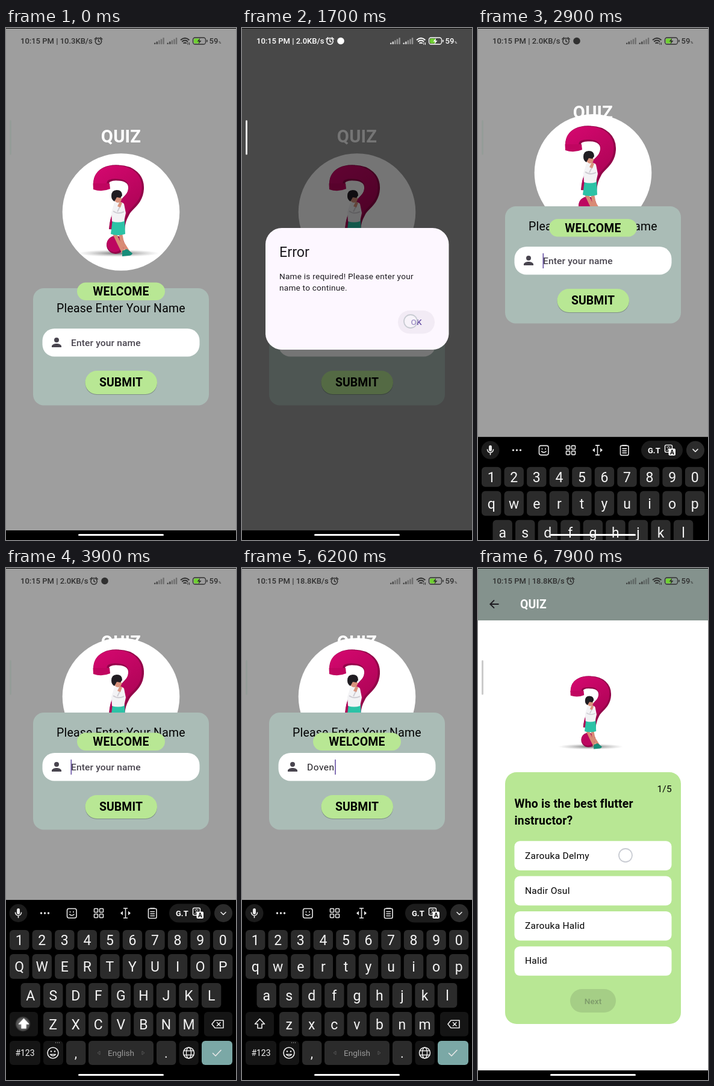
Animation, 382 px wide and 850 px high, one loop 8000 ms. Source, as an HTML page:

```html
<!DOCTYPE html>
<html lang="en">
<head>
<meta charset="utf-8">
<title>Quiz app</title>
<style>
  html, body { margin: 0; width: 100%; height: 100%; overflow: hidden; background: #000; }
  svg { display: block; width: 100vw; height: 100vh; }
  text { font-family: Roboto, "Noto Sans CJK SC", sans-serif; white-space: pre; }
  .line { fill: none; stroke: #e8e8e8; stroke-width: 1.6; stroke-linecap: round; stroke-linejoin: round; }
</style>
</head>
<body>
<svg id="stage" viewBox="0 0 382 850"></svg>
<script>
const LOOP = 8000;
const GREEN = '#b8e794', INK = '#1d1b20', SAGE = '#aabcb6';

const rect = (x, y, w, h, r, fill, more = '') =>
  `<rect x="${x}" y="${y}" width="${w}" height="${h}" rx="${r}" fill="${fill}" ${more}/>`;
const dot = (x, y, r, fill, more = '') => `<circle cx="${x}" cy="${y}" r="${r}" fill="${fill}" ${more}/>`;
const line = (d, more = '') => `<path class="line" d="${d}" ${more}/>`;
// cy is the middle of the capitals
const label = (x, cy, size, text, o = {}) =>
  `<text x="${x}" y="${cy + size * 0.355}" font-size="${size}" font-weight="${o.w || 400}" fill="${o.fill || '#000'}"
    text-anchor="${o.at || 'start'}" letter-spacing="${o.ls || 0}" ${o.more || ''}>${text}</text>`;

// ---------- illustration ----------
const hook = 'M158 260C157 243 174 239.5 187 240.5C206 241 217 252 216 267C215 286 199 291 193 304C187 315 185 322 184 335';
const art = `<g id="art">
  <ellipse cx="187" cy="374" rx="68" ry="6" fill="url(#floor)"/>
  <path d="${hook}" fill="none" stroke="#930349" stroke-width="26" stroke-linejoin="round"/>
  <path d="${hook}" fill="none" stroke="url(#pink)" stroke-width="22" transform="translate(-1.5 -1)"/>
  <path d="M144.500 258h27.500l1 9q-14 6-28 1z" fill="#c00560"/>
  ${dot(182, 360, 15, '#930349')}${dot(180.500, 359, 13, '#bd0660')}
  <path d="M180 341L187 356L195 372M190 341L193 356L203 372" fill="none" stroke="#d98b75" stroke-width="6"/>
  <path d="M193 370l8-3l9 7q-1 4-7 4l-10 1z" fill="#178d79"/>
  <path d="M177 318h20l1 24q-12 4-24 0z" fill="#2cc2a6"/>
  <path d="M180 290q11-4 16 2l3 15l-3 14q-10 3-20 0l-1-15z" fill="#f3f3f5"/>
  <path d="M178 304q8 6 18 1M185 305l5-10" fill="none" stroke="#cfcdd3" stroke-width="2"/>
  ${dot(186, 284, 6, '#d9937d')}
  <path d="M185 296l4-8l4 2l-3 8z" fill="#d9937d"/>
  <path d="M175 279q0-10 9-10q9 0 9 9l-3 4l-6-1l-4 7q-5-3-5-9z" fill="#201d22"/>
</g>`;

// ---------- name page ----------
const person = '<path d="M84 522a4 4 0 1 0 0-8a4 4 0 0 0 0 8zm0 1.900c-3 0-8 1.500-8 4.200v1.900h16v-1.900c0-2.700-5-4.200-8-4.200z" fill="#49454f"/>';
const namePage = `<g id="namePage">
  ${rect(0, 0, 382, 834, 0, '#9e9e9e')}
  <g id="title">${label(191, 180, 29.15, 'QUIZ', { w: 700, fill: '#fff', at: 'middle', ls: 0.24 })}</g>
  <g id="badge">${dot(191, 305.5, 97.3, '#fff')}<use href="#art"/></g>
  <g id="card">
    ${rect(45, 432, 292, 194.5, 18, SAGE)}
    ${label(84, 465, 19.4, 'Please Enter Your Name', { ls: 0.24 })}
    ${rect(60.5, 499, 261, 46.5, 20, '#fff')}
    ${person}
    ${label(108, 522, 15.55, 'Enter your name', { w: 500, fill: '#49454f', ls: 0.15, more: 'id="hint"' })}
    ${label(108, 522, 15.55, '', { fill: INK, ls: 0.49, more: 'id="typed"' })}
    ${rect(107.5, 510, 1.6, 25, 0, '#6750a4', 'id="caret"')}
    ${rect(131.5, 570.5, 119.5, 38.5, 19.2, '#7f9088')}
    ${rect(131.5, 569, 119.5, 39, 19.5, GREEN)}
    <g clip-path="url(#pill)">${dot(228, 588, 0, '#8a9a78', 'id="ripple"')}</g>
    ${label(191, 588.5, 19.4, 'SUBMIT', { w: 700, at: 'middle', ls: 0.1 })}
  </g>
  <g id="welcome">
    ${rect(118, 422.500, 146, 29.500, 14.700, GREEN)}
    ${label(191, 437.5, 19.4, 'WELCOME', { w: 700, at: 'middle', ls: 0.24 })}
  </g>
</g>`;

// ---------- dialog ----------
const dialog = `<g id="dialog">
  ${rect(0, 0, 382, 834, 0, '#000', 'fill-opacity=".54"')}
  ${rect(39, 332, 304.500, 202, 27, '#fdf7ff')}
  ${label(62, 371.5, 23.3, 'Error', { fill: INK })}
  ${label(62, 412, 13.6, 'Name is required! Please enter your', { fill: INK, ls: 0.24 })}
  ${label(62, 431.5, 13.6, 'name to continue.', { fill: INK, ls: 0.24 })}
  ${rect(259, 469, 61, 38.5, 19.2, '#f2ebf5', 'id="okPress"')}
  ${label(289.5, 488, 13.6, 'OK', { w: 500, fill: '#6750a4', at: 'middle', ls: 0.1 })}
</g>`;

// ---------- question page ----------
const answers = ['Zarouka Delmy', 'Nadir Osul', 'Zarouka Halid', 'Halid'];
const quizPage = `<g id="quizPage">
  ${rect(0, 0, 382, 834, 0, '#fff')}
  ${rect(0, 0, 382, 87, 0, '#84928d')}
  <path d="M34.500 60H20.500M27 53.300L20.300 60L27 66.700" fill="none" stroke="${INK}" stroke-width="1.900"/>
  ${label(70, 60.5, 19.4, 'QUIZ', { w: 700, fill: '#fff', ls: 0.1 })}
  <use href="#art" transform="translate(37.8 -2.6) scale(.8)"/>
  ${rect(45, 339, 292, 418, 19, GREEN)}
  ${label(322, 366, 15.55, '1/5', { at: 'end', ls: 0.24 })}
  ${label(60.5, 391.5, 19.4, 'Who is the best flutter', { w: 700, ls: 0.2 })}
  ${label(60.5, 419.5, 19.4, 'instructor?', { w: 700, ls: 0.2 })}
  ${answers.map((a, i) => rect(60.5, 453.3 + i * 58.3, 261, 48.6, 9, '#fff') +
    label(78, 477 + i * 58.3, 15.55, a, { ls: 0.24 })).join('')}
  ${rect(153, 699, 76, 39, 19.500, '#a5ce86')}
  ${label(191, 719, 13.6, 'Next', { w: 500, fill: '#7d9a6a', at: 'middle', ls: 0.1 })}
</g>`;

// ---------- keyboard, drawn from its own top edge ----------
const KEY_TOP = 551, KEY_H = 299;
const rows = [['1234567890', 6, 50, 33], ['qwertyuiop', 6, 90, 41], ['asdfghjkl', 24.5, 138, 41], ['zxcvbnm', 62, 186, 40.5]];
const spots = { shift: [28, 757], back: [352, 757] };
let keys = '';
for (const [chars, x0, y, h] of rows) {
  [...chars].forEach((c, i) => {
    const x = x0 + i * 37.55, cx = x + 16.2, cy = y + h / 2;
    spots[c] = [cx, KEY_TOP + cy];
    keys += rect(x, y, 32.4, h, 6, '#2b2b2b') +
      label(cx, cy + 0.5, 23, c, { fill: '#f4f4f4', at: 'middle', more: 'class="ch"' });
  });
}
const DARK = '#151515', MID = '#2b2b2b';
const tools = `
  ${dot(20.5, 22, 15, '#1c1c1c')}
  <g id="mic">${rect(18, 14, 5, 10, 2.5, '#e8e8e8')}${line('M15.500 21a5 5 0 0 0 10 0M20.500 26.500v3')}</g>
  ${[58.5, 64.5, 70.5].map(x => dot(x, 22, 1.7, '#e8e8e8')).join('')}
  ${rect(101.5, 14.500, 15.500, 15.500, 3, 'none', 'stroke="#e8e8e8" stroke-width="1.600"')}
  ${dot(106.5, 20, 1.1, '#e8e8e8')}${dot(112, 20, 1.1, '#e8e8e8')}${line('M105.500 24q3.700 3.500 7.500 0')}
  ${[146.500, 155.500].map(x => [14.500, 23.500].map(y =>
    rect(x, y, 6, 6, 1, 'none', 'stroke="#e8e8e8" stroke-width="1.600"')).join('')).join('')}
  ${line('M195.500 14h6M198.500 14v16M195.500 30h6')}
  <path d="M194 18.500v7l-4-3.500zM203 18.500v7l4-3.500z" fill="#e8e8e8"/>
  ${rect(236.500, 14.500, 13.500, 16, 2, 'none', 'stroke="#e8e8e8" stroke-width="1.600"')}
  ${line('M240 14h6.500M240 19.500h6.500M240 23h6.500M240 26.500h6.500')}
  ${rect(271, 6.5, 69, 31, 15.500, '#1c1c1c')}
  ${label(282, 22.5, 13, 'G.T', { w: 700, fill: '#fff' })}
  ${rect(310.500, 13.500, 12, 12, 2, 'none', 'stroke="#fff" stroke-width="1.400"')}
  ${label(316.500, 19.5, 8, '文', { fill: '#fff', at: 'middle' })}
  ${rect(316.500, 19.500, 11.500, 11.500, 2, '#fff')}
  ${label(322.300, 25.5, 10, 'A', { w: 700, at: 'middle' })}
  ${dot(361, 22, 15, '#2b2b2b')}${line('M357 20.500l4 4l4-4')}`;
const controls = `
  ${rect(6, 186, 47, 40.5, 6, DARK)}${dot(28, 206, 13, 'url(#glow)', 'id="shiftGlow"')}
  <path id="arrow" d="M29.500 197.500l8 8.500h-4.500v7h-7v-7h-4.500z" stroke="#f0f0f0" stroke-width="1.600" stroke-linejoin="round"/>
  ${rect(329, 186, 47, 40.5, 6, DARK)}
  ${line('M347 200h14v12.500h-14l-5-6.200zM350.500 203.500l5.500 5.500m0-5.500l-5.500 5.500')}
  ${rect(6, 234, 51, 40, 6, DARK)}${label(31.500, 254.5, 14, '#123', { fill: '#f0f0f0', at: 'middle' })}
  ${rect(62, 234, 33, 40, 6, DARK)}${dot(78, 254, 9, 'none', 'stroke="#f0f0f0" stroke-width="1.600"')}
  ${dot(75, 251.500, 1.3, '#f0f0f0')}${dot(81, 251.500, 1.3, '#f0f0f0')}${line('M73.500 256.500q4.500 5 9 0z')}
  ${[82.5, 85.5, 88.5].map(x => dot(x, 237, 0.7, '#aaa')).join('')}
  ${rect(100, 234, 32.4, 40, 6, MID)}${label(116, 254.5, 22, ',', { fill: '#f0f0f0', at: 'middle' })}
  ${rect(137, 234, 108, 40, 6, MID)}${label(191, 254, 13.6, 'English', { fill: '#9a9a9a', at: 'middle' })}
  <path d="M156 251v6l-4-3zM226 251v6l4-3z" fill="none" stroke="#555"/>
  ${rect(250, 234, 32.4, 40, 6, MID)}${label(266, 254.5, 22, '.', { fill: '#f0f0f0', at: 'middle' })}
  ${rect(287.500, 234, 32.4, 40, 6, DARK)}
  ${dot(303.500, 254, 9, 'none', 'stroke="#f0f0f0" stroke-width="1.500"')}
  <ellipse cx="303.500" cy="254" rx="4" ry="9" fill="none" stroke="#f0f0f0" stroke-width="1.400"/>
  ${line('M295.500 250.500h16M295.500 257.500h16')}
  ${rect(325, 234, 51, 40, 6, '#7ba8a6')}${line('M343.500 254.500l4.500 4.500l9-9.500')}`;
const keyboard = `<g id="keyboard">${rect(0, 0, 382, KEY_H, 0, '#000')}${tools}${keys}${controls}</g>`;

// ---------- system bars ----------
const signal = x => [0, 1, 2, 3, 4].map(i =>
  rect(x + i * 3.6, 24.500 - i * 2.1, 2.4, 2.5 + i * 2.1, 0.8, 'currentColor', `opacity="${i < 2 ? 0.8 : 0.42}"`)).join('');
const status = `<g id="status">
  ${label(24, 21.5, 13, '', { w: 500, fill: 'currentColor', more: 'id="clock"' })}
  <g id="alarm" fill="none" stroke="currentColor" stroke-width="1.500" stroke-linecap="round">
    <circle cy="22" r="5.200"/><path d="M0 19v3l2 1.200M-6.300 18.500l3-2.700M6.300 18.500l-3-2.700"/></g>
  ${dot(164, 21.5, 5.8, 'currentColor', 'id="notice"')}
  ${signal(246)}${signal(267.5)}
  <g fill="none" stroke="currentColor" stroke-width="1.900">
    <path d="M290 20q7.200-6.500 14.400 0M292.300 22.800q4.900-4.400 9.800 0M294.600 25.400q2.600-2 5.200 0"/></g>
  <path d="M302 24v4M304.500 28v-4" stroke="currentColor" stroke-width="1"/>
  ${rect(310.500, 16, 21, 11, 3.500, 'none', 'stroke="currentColor" stroke-width="1.300"')}
  ${rect(312, 17.500, 10, 8, 2, '#6fd032')}
  <path d="M322.500 16.500l-5 6h3.300l-1.300 4.500l5-6h-3.300z" fill="currentColor"/>
  ${rect(333, 19.500, 1.600, 4, 0.8, 'currentColor')}
  ${label(337.5, 21.5, 13, '59', { w: 500, fill: 'currentColor' })}
  ${label(353, 23.5, 6, '%', { w: 500, fill: 'currentColor' })}
</g>`;

document.getElementById('stage').innerHTML = `<defs>
  <linearGradient id="pink" x1="0" y1="0" x2=".4" y2="1"><stop stop-color="#d0076c"/><stop offset="1" stop-color="#ac0455"/></linearGradient>
  <radialGradient id="floor"><stop stop-color="#555" stop-opacity=".85"/><stop offset="1" stop-color="#999" stop-opacity="0"/></radialGradient>
  <radialGradient id="glow"><stop stop-color="#fff" stop-opacity=".5"/><stop offset=".8" stop-color="#fff" stop-opacity=".25"/><stop offset="1" stop-color="#fff" stop-opacity="0"/></radialGradient>
  <clipPath id="pill"><rect x="131.500" y="569" width="119.500" height="39" rx="19.500"/></clipPath>
  <clipPath id="app"><rect width="382" height="834"/></clipPath>
  ${art}</defs>
  ${rect(0, 0, 382, 850, 0, '#000')}
  <g clip-path="url(#app)">${namePage}${dialog}${quizPage}</g>
  ${keyboard}
  ${rect(120, 840, 142, 3, 1.5, '#fff')}
  ${status}
  ${rect(6, 153, 3, 57.5, 1.5, '#fff', 'id="handle"')}
  ${rect(0, 0, 382, 1, 0, '#000')}
  ${dot(0, 0, 11, '#fff', 'id="touch" fill-opacity=".4" stroke="#c9ccd3" stroke-width="1.800"')}`;

const $ = {};
document.querySelectorAll('[id]').forEach(e => { $[e.id] = e; });
const caps = [...document.querySelectorAll('.ch')];

// ---------- timeline ----------
const typing = [[0, ''], [4150, 'D'], [4290, 'Do'], [4420, 'Dov'], [4560, 'Dovr'], [4690, 'Dovrn'],
  [5380, 'Dovr'], [5540, 'Dov'], [5840, 'Dove'], [6060, 'Doven']];
const taps = [[850, 200, 588, 120], [1600, 280, 487, 200], [2580, 165, 522, 120], [3730, ...spots.shift, 60],
  [6700, 232, 397, 90], [7800, 245, 477, 200]];
typing.slice(1).forEach(([at, text], i) => {
  const key = text.length < typing[i][1].length ? 'back' : text.at(-1).toLowerCase();
  taps.push([at - 40, ...spots[key], 50]);
});
const speeds = [[0, '10.3'], [500, '2.0'], [4800, '18.8']];

const ramp = (t, from, span) => Math.min(1, Math.max(0, (t - from) / span));
const easeOut = (p, n) => 1 - (1 - p) ** n;
const smooth = p => p * p * (3 - 2 * p);
const latest = (list, t) => list.findLast(step => step[0] <= t);
const set = (e, o) => { for (const k in o) e.setAttribute(k, o[k]); };
const show = (e, on) => { e.style.display = on ? '' : 'none'; };
const write = (e, s) => { if (e.textContent !== s) e.textContent = s; };
const zoom = s => `translate(191 417) scale(${s}) translate(-191 -417)`;

function render(t) {
  // form lifts above the keyboard, each part by its own share
  const lift = 192 * easeOut(ramp(t, 2800, 300), 3);
  const parts = { title: 0.3, badge: 0.479, card: 1, welcome: 0.776 };
  for (const id in parts) set($[id], { transform: `translate(0 ${-lift * parts[id]})` });

  const down = 1 - easeOut(ramp(t, 2800, 300), 2.07) + smooth(ramp(t, 6760, 240));
  set($.keyboard, { transform: `translate(0 ${KEY_TOP + KEY_H * down})` });
  show($.keyboard, down < 1);
  const upper = t >= 3750 && t < 4150;
  caps.forEach(e => write(e, upper ? e.textContent.toUpperCase() : e.textContent.toLowerCase()));
  set($.arrow, { fill: upper ? '#fff' : 'none' });
  set($.shiftGlow, { opacity: upper ? 1 - ramp(t, 3900, 150) : 0 });
  set($.mic, { opacity: t > 6760 ? 0.35 : 1 });

  const [typedAt, text] = latest(typing, t);
  write($.typed, text);
  show($.hint, !text);
  const since = t - Math.max(typedAt, 2650);
  show($.caret, since >= 0 && since % 1000 < 500 && t < 6760);
  set($.caret, { x: text ? 108.5 + $.typed.getComputedTextLength() : 107.5 });

  const press = t < 3000 ? 860 : 6720;
  set($.ripple, { r: t > press ? 20 + 100 * ramp(t, press, 500) : 0,
    opacity: 0.45 * (1 - ramp(t, press + 150, 250)) });

  const dim = ramp(t, 1000, 150) - ramp(t, 1880, 120);
  set($.dialog, { opacity: dim });
  show($.dialog, dim > 0);
  set($.okPress, { opacity: ramp(t, 1600, 80) });

  const turn = easeOut(ramp(t, 6950, 300), 2);
  show($.quizPage, turn > 0);
  set($.quizPage, { opacity: ramp(t, 6950, 150), transform: zoom(0.85 + 0.15 * turn) });
  set($.namePage, { transform: zoom(1 + 0.05 * turn) });

  const speed = latest(speeds, t)[1];
  write($.clock, `10:15 PM | ${speed}KB/s`);
  set($.alarm, { transform: `translate(${speed.length > 3 ? 153.5 : 146} 0)` });
  show($.notice, speed === '2.0');
  $.status.style.color = dim > 0.5 ? '#fff' : '#303030';

  const faint = dim <= 0 && t < 7000;
  set($.handle, { fill: dim > 0 ? '#e6e6e6' : t < 7000 ? '#86988f' : '#cbcbcb', opacity: faint ? 0.4 : 1 });

  const tap = taps.find(([at, , , hold]) => t >= at && t < at + hold + 80);
  show($.touch, tap);
  if (tap) set($.touch, { cx: tap[1], cy: tap[2], opacity: 1 - ramp(t, tap[0] + tap[3], 80) });
}

const start = performance.now();
function tick() {
  render((performance.now() - start) % LOOP);
  requestAnimationFrame(tick);
}
tick();
</script>
</body>
</html>
```
